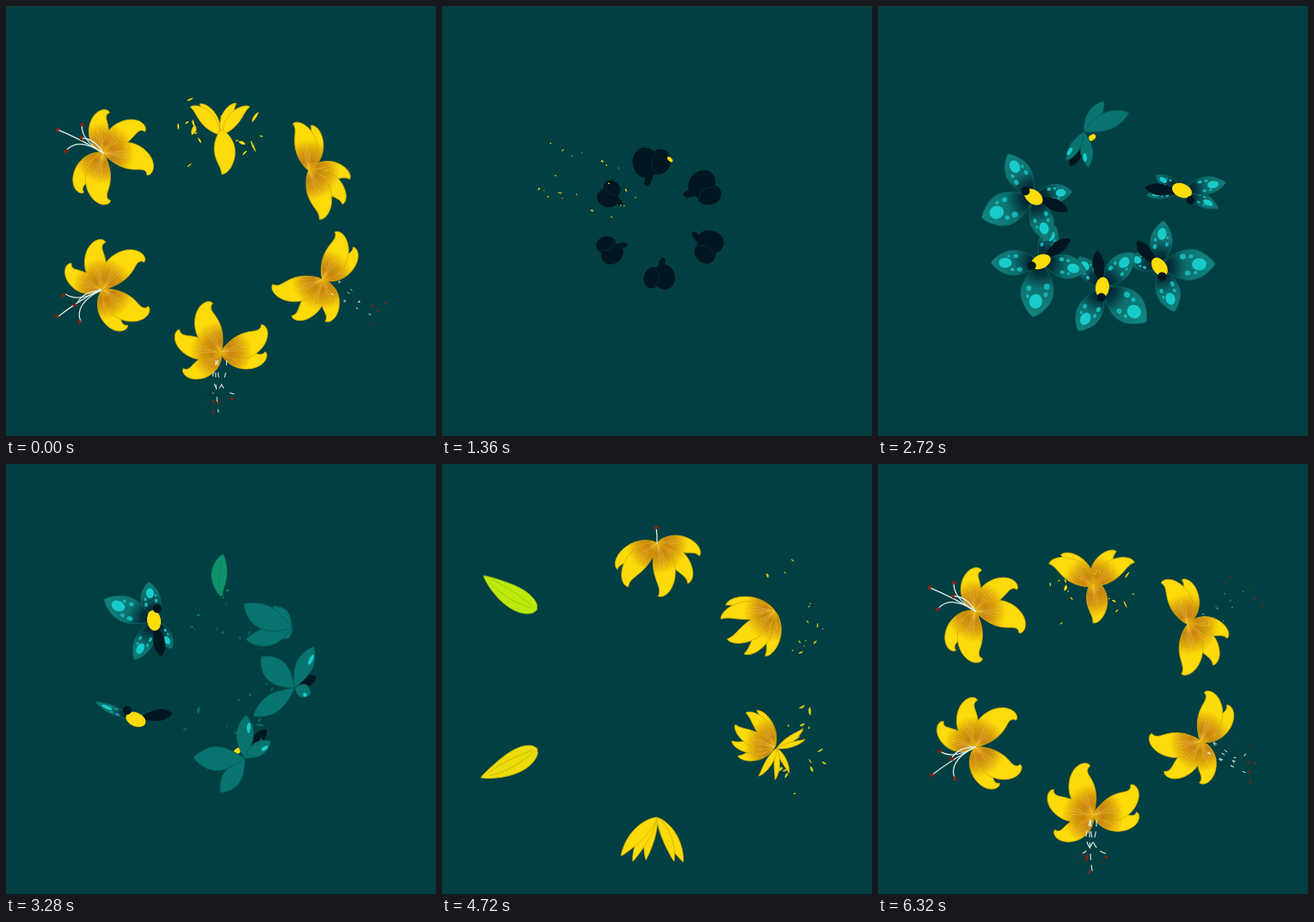
An HTML page with a canvas that plays this animation: 500 by 500 pixels, repeating every 6400 ms.

```html
<!DOCTYPE html>
<html lang="en">
<head>
<meta charset="utf-8">
<title>Flower ring</title>
<style>
html, body { margin: 0; width: 100%; height: 100%; overflow: hidden; background: #023f42; }
canvas { display: block; width: 100vw; height: 100vh; }
</style>
</head>
<body>
<canvas id="stage" width="500" height="500"></canvas>
<script>
const ctx = document.getElementById('stage').getContext('2d');
const LOOP = 6400, STEP = 80, LAG = 160, RAD = Math.PI / 180;
const YELLOW = '#fddb08', DARK = '#02161f', TEAL = '#08746f', CYAN = '#18cbcb';

// Petal directions are in degrees; 0 points away from the ring's centre
const LILY = [
  { dir: 58, len: 55, wid: 23, side: 1 },
  { dir: 112, len: 63, wid: 25, side: 1 },
  { dir: 166, len: 66, wid: 30, side: 1 },
  { dir: -118, len: 65, wid: 29, side: -1 },
  { dir: -83, len: 59, wid: 22, side: -1 }
];
const ORCHID = [
  { dir: -52, len: 65, wid: 38 },
  { dir: 29, len: 58, wid: 29 },
  { dir: 222, len: 54, wid: 27 },
  { dir: 142, len: 45, wid: 22 }
];
const STAMENS = [
  { tip: [60, -3], mid: [30, 1] },
  { tip: [39, -20], mid: [36, 2] },
  { tip: [38, 16], mid: [30, 0] },
  { tip: [31, 2], mid: [18, 10] }
];

const ramp = (a, b, t) => Math.max(0, Math.min(1, (t - a) / (b - a)));
const ease = (a, b, t) => {
  const k = ramp(a, b, t);
  return k * k * (3 - 2 * k);
};
const rand = n => {
  const v = Math.sin(n * 127.1 + 11.7) * 43758.5453;
  return v - Math.floor(v);
};
const polar = (r, deg) => [r * Math.cos(deg * RAD), r * Math.sin(deg * RAD)];

function oval(x, y, rx, ry, turn, fill) {
  ctx.beginPath();
  ctx.ellipse(x, y, Math.max(0, rx), Math.max(0, ry), turn, 0, 7);
  ctx.fillStyle = fill;
  ctx.fill();
}

// Traces a petal along a bending spine and returns the spine
function petal(x, y, dir, len, wid, bend, curl, peak) {
  const n = 28, spine = [], back = [];
  ctx.beginPath();
  for (let i = 0; i <= n; i++) {
    const u = i / n, h = dir * RAD + bend * (u - .45) + curl * u ** 7;
    const w = wid / 2 * Math.abs(Math.sin(Math.PI * u ** peak)) ** .8;
    const nx = -Math.sin(h) * w, ny = Math.cos(h) * w;
    ctx.lineTo(x + nx, y + ny);
    back.unshift([x - nx, y - ny]);
    spine.push([x, y, h]);
    x += Math.cos(h) * len / n;
    y += Math.sin(h) * len / n;
  }
  back.forEach(p => ctx.lineTo(...p));
  ctx.closePath();
  return spine;
}

function paint(fill, line, width) {
  ctx.fillStyle = fill;
  ctx.fill();
  ctx.strokeStyle = line;
  ctx.lineWidth = width;
  ctx.stroke();
}

function glow(x, y, r, stops) {
  const g = ctx.createRadialGradient(x, y, 0, x, y, r);
  stops.forEach(s => g.addColorStop(...s));
  return g;
}

// Scatters small crescents over a ring sector
function flecks(n, seed, x, y, near, far, spread, heading, size, color) {
  for (let i = 0; i < n; i++) {
    const q = seed + i * 7;
    const [px, py] = polar(near + (far - near) * rand(q), heading + spread * (2 * rand(q + 1) - 1));
    const [dx, dy] = polar(size * (.2 + .8 * rand(q + 2) ** 2) / 2, 360 * rand(q + 3));
    const k = .15 + .5 * rand(q + 4);
    ctx.beginPath();
    ctx.moveTo(x + px - dx, y + py - dy);
    ctx.quadraticCurveTo(x + px - dy * k * 2, y + py + dx * k * 2, x + px + dx, y + py + dy);
    ctx.quadraticCurveTo(x + px + dy * k, y + py - dx * k, x + px - dx, y + py - dy);
    paint(color, color, .7);
  }
}

function drawStamens(x, s, seed) {
  const grow = ramp(4560, 5280, s) ** .8, k = ramp(5700, 6180, s);
  if (!grow || k === 1) return;
  ctx.lineCap = 'round';
  STAMENS.forEach(({ tip, mid }, i) => {
    const g = i ? ramp(5000, 5320, s) : grow;
    if (!g) return;
    const drift = x + k * 22, side = k * 30 * (rand(seed + i * 5) - .5);
    ctx.beginPath();
    ctx.moveTo(drift, side);
    ctx.quadraticCurveTo(drift + mid[0] * g, side + mid[1] * g, drift + tip[0] * g, side + tip[1] * g);
    ctx.setLineDash(k > .15 ? [9 * (1 - k), 2 + 16 * k] : []);
    ctx.strokeStyle = '#dfeee6';
    ctx.lineWidth = 1.3 - k * .6;
    ctx.stroke();
    ctx.setLineDash([]);
    oval(drift + tip[0] * g + k * 12 * i, tip[1] * g + side * 2, 2.8 - k * 1.7, 1.8 - k, 1 + i, '#87210f');
  });
  if (k > .2) flecks(5, seed, x, 0, 35, 60, 30, 0, 5 * (1 - k), '#6b2415');
}

function lilyPetal(p, x, y, dir, len, wid, bend, fill) {
  const b = bend * p.side * .75;
  petal(x, y, dir, p.len * len, p.wid * wid, b, bend > 0 ? p.side * 1.9 * Math.min(1, bend) : 0, .9);
  paint(fill, '#d5ad06', .8);
  return b;
}

function streaks(x, dir, len, bend) {
  ctx.beginPath();
  for (let j = -1; j <= 1; j++) {
    const [ex, ey] = polar(len * (.5 - .1 * Math.abs(j)), dir + j * 9 - bend * 16);
    ctx.moveTo(x, 0);
    ctx.lineTo(x + ex, ey);
  }
  ctx.strokeStyle = 'rgba(250,214,105,.6)';
  ctx.lineWidth = .6;
  ctx.stroke();
}

// The bud's petals spread and wear away while the open flower grows behind them
function drawOpening(s, seed) {
  const k = ramp(4160, 4440, s);
  LILY.forEach(p => lilyPetal(p, 161, 0, p.dir * (.12 + .5 * k), 1.1 - .6 * k, .6 - .4 * k, k - .7, YELLOW));
  if (s > 4240) flecks(14, seed, 159, 0, 26, 60, 100, 0, 15 * (1 - ramp(4320, 4720, s)), '#d3cf13');
}

function drawLily(s, seed) {
  if (s < 4440) drawOpening(s, seed);
  else if (s < 4720) flecks(14, seed, 159, 0, 36, 62, 100, 0, 13 * (1 - ramp(4320, 4720, s)), '#d3cf13');

  const grow = .3 + .7 * ease(4240, 4480, s), open = .4 + .6 * ease(4480, 5000, s);
  const close = ramp(5840, 6400, s), fall = ramp(6400, 6840, s);
  const r = 158 - 60 * close ** 1.2;
  const orange = glow(r, 0, 36, [[0, '#eeb510'], [.3, '#c98510'], [.6, '#d69a0d'], [1, YELLOW]]);
  ctx.lineJoin = 'round';
  if (s > 4240 && fall < 1) [4, 0, 1, 3, 2].forEach(i => {
    const p = LILY[i], front = i === 2;
    let dir = p.dir * (1 - .65 * close ** 1.5);
    if (open < 1) dir = 180 + ((p.dir + 360) % 360 - 180) * open;
    let len = grow * (1 - .1 * close), wid = grow * (.5 + .5 * open) * (1 - .15 * close), x = r, y = 0;
    if (front && close > .8) {
      // the front petal drops towards the ring's centre
      dir = 174 + 40 * fall;
      len = .8 - .6 * fall;
      wid = .8 - .45 * fall;
      x += 8 - 75 * fall;
    } else if (close === 1) {
      const [dx, dy] = polar(4 + 42 * fall, dir * (1 + fall));
      x += dx;
      y += dy;
      len = .72 - .62 * fall;
      wid = .55 - .4 * fall;
    }
    const bend = lilyPetal(p, x, y, dir, len, wid, open * (1 - .6 * close) + fall, close === 1 ? YELLOW : orange);
    if (close < 1) streaks(r, dir, p.len * len, bend);
  });
  drawStamens(r, s, seed);

  const worn = ramp(6300, 7100, s);
  if (worn > 0 && worn < 1) {
    flecks(16, seed + 90, 102, 0, 20, 54, 140, 0, 22 * (1 - worn) * ramp(6240, 6440, s), YELLOW);
    if (fall) flecks(6, seed + 190, 50, 0, 4, 26, 180, 0, 24 * (1 - worn), YELLOW);
  }
}

function drawSeed(s) {
  const grow = ramp(200, 560, s), open = ramp(1400, 1640, s);
  const size = (3 + 12 * grow + 6 * ramp(560, 1360, s)) * (1 - .7 * open);
  const [x, y] = polar(26 + 37 * grow + 6 * ramp(560, 1520, s), -5 * ramp(560, 1360, s));
  const gap = open * 16;
  oval(x - size * .95, y - size * .2, size * .35, size * .2, .4, DARK);
  oval(x + 1, y + size * .42 + gap, size * .72, size * .6, .3, DARK);
  oval(x, y - size * .35 - gap, size * .85, size * .72, -.2, DARK);
  if (open) return;
  ctx.beginPath();
  ctx.arc(x, y + size * .7, size * .7, 3.6, 5.8);
  ctx.strokeStyle = '#08303a';
  ctx.lineWidth = .8;
  ctx.stroke();
  if (s > 1270) oval(x + 4, y + 21, 2, 4, .8, YELLOW);
}

function spots(spine, len, wid) {
  const [x, y, h] = spine[20];
  oval(x, y, len * .13, wid * .2, h, CYAN);
  for (let i = 0; i < 4; i++) {
    const [px, py, a] = spine[12 + i * 2], d = wid * (i % 2 ? .27 : -.27), size = len * (.055 - .007 * i);
    oval(px - Math.sin(a) * d, py + Math.cos(a) * d, size, size * wid / len * 1.6, a, '#14b5b4');
  }
}

// The orchid is a cup of petals that turns over in space, then folds shut
function drawOrchid(s, seed) {
  const turn = ramp(2320, 3120, s), wave = 2 * Math.PI * turn;
  const tilt = Math.min(130, 225 * turn) * RAD;
  const axis = 35 + 90 * ease(2720, 3120, s), spin = 47 * ease(2320, 2500, s);
  const cup = -.35 * ease(2320, 2440, s) + .6 * ease(2440, 2640, s) + .8 * ease(2960, 3140, s);
  const size = (.1 + .9 * ease(1420, 1740, s)) * (1 - ease(3120, 3250, s));
  const flat = .25 + .75 * Math.abs(Math.cos(tilt));
  const lift = turn ? 16 + 16 * Math.cos(wave - 2.2) + 18 * turn ** 4 : 0;
  const [x, y] = polar(70 + 8 * ease(1520, 2240, s) + lift, -8 + (turn ? 2 : 0) + 18 * Math.sin(wave));
  const back = tilt > 1.65;

  const project = (dir, len, rise) => {
    const [px, py] = polar(Math.cos(rise), dir + spin - axis);
    const qy = py * Math.cos(tilt) + Math.sin(rise) * Math.sin(tilt);
    return [Math.atan2(qy, px) / RAD + axis, Math.hypot(px, qy) * len * size];
  };
  const drawCore = () => {
    const [lipDir, lipLen] = project(172, 43, cup);
    petal(x, y, lipDir, lipLen, 13 * size, .2, 0, 1.5);
    paint(DARK, DARK, .5);
    const eye = Math.min(1, size * 2) * (back ? .4 : 1);
    const [knobDir, knobLen] = project(6, 15, .7);
    const [ex, ey] = polar(back ? 12 : 0, axis + 90);
    oval(x + ex, y + ey, 12 * eye, 8 * eye, (spin + 6) * RAD, '#ffdc06');
    const [kx, ky] = polar(knobLen, knobDir);
    if (!back) oval(x + kx, y + ky, 5 * eye, 5 * eye, 0, DARK);
  };

  const face = glow(x, y, 62, [[0, '#021a24'], [.25, '#04323c'], [.5, '#0d706f'], [1, '#128580']]);
  if (back) drawCore();
  [2, 3, 1, 0].forEach(i => {
    const p = ORCHID[i], [dir, len] = project(p.dir, p.len, cup), wid = p.wid * size * flat;
    const spine = petal(x, y, dir, len, wid, .1 + .4 * ramp(2960, 3120, s), 0, 1.15);
    paint(back ? TEAL : face, back ? '#04565a' : '#0a6667', .8);
    if (!back && size > .5) spots(spine, len, wid);
    if (back && s < 3000 && i > 1) {
      const [px, py, h] = spine[20];
      oval(px - Math.sin(h) * wid * .2, py + Math.cos(h) * wid * .2, len * .12, 2.2, h, CYAN);
    }
  });
  if (s < 1620) drawSeed(s);
  if (!back) drawCore();
  if (s > 1560 && s < 1800) flecks(14, seed, x, y, 34, 54, 180, 0, 14 * ramp(1800, 1560, s), DARK);
}

const budBase = s => 95 + 66 * ease(3260, 3580, s);

function drawBud(s) {
  const ripe = ramp(3280, 4160, s), swell = ease(3500, 3740, s), base = budBase(s);
  const len = (42 + 8 * ramp(3380, 3280, s) + 32 * swell) * ramp(3120, 3280, s);
  const wid = 13 + 5 * ramp(3360, 3280, s) + 13 * swell;
  const hue = 162 - 114 * ripe ** .75, light = 32 + 16 * ease(3440, 3680, s);
  const shade = `hsl(${hue} 85% ${light * .8}%)`;
  const spine = petal(base, 0, 2, len, wid, .55 - .3 * swell, 0, 1.1 - .42 * swell);
  paint(`hsl(${hue} ${80 + 14 * ripe}% ${light}%)`, shade, .8);
  ctx.beginPath();
  for (const k of swell ? [-.15, .2] : [0]) {
    spine.slice(2, 25).forEach(([x, y, h], i) => {
      const d = wid * k * Math.sin((i + 2) / 28 * Math.PI);
      ctx[i ? 'lineTo' : 'moveTo'](x - Math.sin(h) * d, y + Math.cos(h) * d);
    });
  }
  ctx.lineWidth = .6;
  ctx.stroke();
}

function drawFlower(i, time) {
  const s = (time - i * LAG + LOOP) % LOOP, seed = i * 311 + 5;
  ctx.save();
  ctx.translate(250, 250);
  ctx.rotate((i * 60 - 90) * RAD);
  if (s >= 200 && s < 1440) drawSeed(s);
  if (s >= 1440 && s < 3240) drawOrchid(s, seed);
  if (s > 2720 && s < 3600) {
    const k = ramp(2720, 3600, s);
    flecks(9, seed, 85, 0, 25, 62 - 20 * k, 90, 180, 11 * (1 - k), s < 3200 ? '#08706a' : '#0c8a58');
    if (s > 3180) flecks(8, seed + 70, budBase(s), 0, 0, 12, 180, 0, 12 * (1 - k), '#119059');
  }
  if (s >= 3200 && s < 4100) drawBud(s);
  if (s >= 4100 || s < 700) drawLily(s < 700 ? s + LOOP : s, seed);
  ctx.restore();
}

function frame(now) {
  const time = Math.floor(now % LOOP / STEP) * STEP;
  ctx.fillStyle = '#023f42';
  ctx.fillRect(0, 0, 500, 500);
  for (let i = 0; i < 6; i++) drawFlower(i, time);
}

const start = performance.now();
function tick() {
  frame(performance.now() - start);
  requestAnimationFrame(tick);
}
tick();
</script>
</body>
</html>
```
